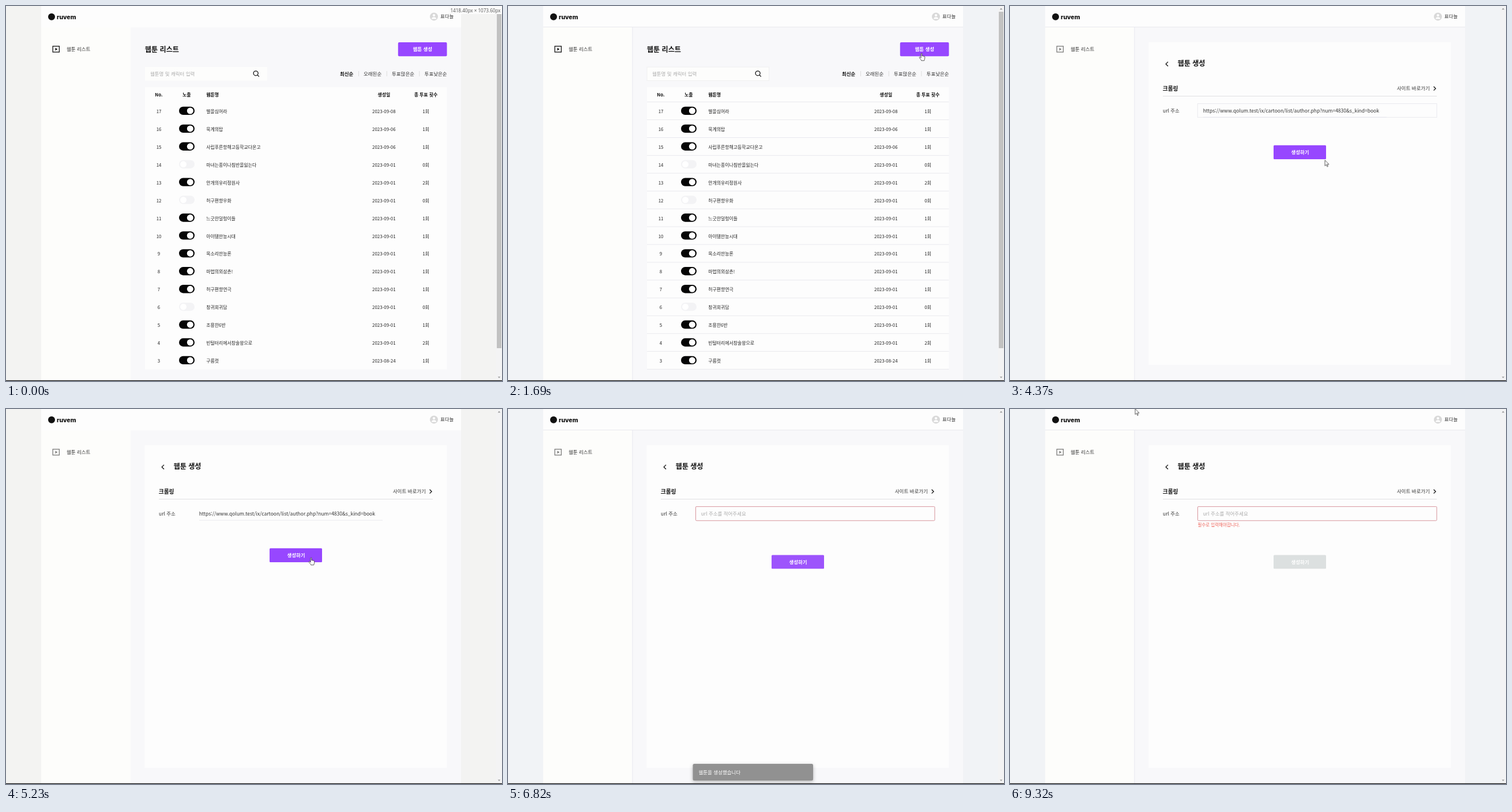
An HTML page that plays this animation: 860 by 651 pixels, repeating every 9.41 s.

```html
<!DOCTYPE html>
<html lang="ko">
<head>
<meta charset="utf-8">
<title>웹툰 관리</title>
<style>
  html, body { margin: 0; width: 100%; height: 100%; overflow: hidden; background: #f2f3f5; }
  svg { display: block; width: 860px; height: 651px; }
  text { font: 400 8.49px "Noto Sans CJK KR", "Noto Sans CJK JP", sans-serif; fill: #333; white-space: pre; }
  .s { font-size: 7.88px; fill: #222; }
  .l { font-size: 12.13px; fill: #111; }
  .b { font-weight: 700; fill: #111; }
  .m { font-weight: 500; }
  .mid { text-anchor: middle; }
  .hint { fill: #ababab; }
  .white { fill: #fff; }
  .line { stroke: #e9e9ee; stroke-width: 1; fill: none; }
  .ink { stroke: #111; stroke-width: 1.3; fill: none; }

  /* One shared 9410 ms loop; switches jump, the rest eases. */
  .sw { animation: 9410ms step-end infinite; }
  .mv { animation: 9410ms linear infinite; }

  .margin { animation-name: margin; }
  @keyframes margin { 0%, 51.222% { fill: #f3f3f2 } 5.845%, 66.419%, 100% { fill: #f1f3f6 } }
  .crisp { animation-name: crisp; }
  @keyframes crisp { 0%, 51.222% { opacity: 0 } 5.845%, 66.419%, 100% { opacity: 1 } }
  .label { animation-name: label; }
  @keyframes label { 0% { opacity: 1 } 5.845%, 100% { opacity: 0 } }
  .list { animation-name: list; }
  @keyframes list { 0% { opacity: 1 } 18.916%, 100% { opacity: 0 } }
  .form { animation-name: form; }
  @keyframes form { 0% { opacity: 0 } 18.916%, 100% { opacity: 1 } }
  .nav { animation-name: nav; }
  @keyframes nav { 0% { opacity: 1 } 18.916%, 100% { opacity: .55 } }

  .ask { animation-name: ask; }
  @keyframes ask { 0%, 71.52%, 100% { opacity: 1 } 35.813% { opacity: 0 } }
  .url { animation-name: url; }
  @keyframes url { 0%, 71.52%, 100% { opacity: 0 } 35.813% { opacity: 1 } }
  .caret { animation-name: caret; }
  @keyframes caret { 0%, 34.963%, 100% { opacity: 0 } 29.437% { opacity: 1 } }
  .bad { animation-name: bad; }
  @keyframes bad { 0% { opacity: 0 } 71.52%, 100% { opacity: 1 } }
  .error { animation-name: error; }
  @keyframes error { 0%, 72.8% { opacity: 0 } 74.92%, 100% { opacity: 1 } }
  .shift { animation-name: shift; }
  @keyframes shift { 0% { transform: none } 71.52%, 100% { transform: translateY(11.6px) } }
  .send { animation-name: send; }
  @keyframes send {
    0%, 35.813%, 74.92%, 100% { fill: #dce0e0 }
    38.47%, 72.264% { fill: #9747ff }
  }

  .toast { transform-origin: 425px 630px; animation-name: toast; }
  @keyframes toast {
    0%, 71.52% { opacity: 0; transform: scale(.75, .56); animation-timing-function: ease-out }
    72.37%, 88.4% { opacity: 1; transform: none; animation-timing-function: ease-in }
    89.479%, 100% { opacity: 0; transform: scale(.85, .75) }
  }

  .cursor { animation-name: cursor; }
  @keyframes cursor {
    0%, 5.845% { transform: translate(860px, 330px); animation-timing-function: ease-in-out }
    15.834%, 24.23% { transform: translate(717px, 82px); animation-timing-function: ease-in }
    25.824%, 41.125% { transform: translate(600px, 182px) }
    41.126% { transform: translate(722px, 190px); animation-timing-function: ease-in-out }
    46.76% { transform: translate(545px, 268px); animation-timing-function: ease-in-out }
    50.903%, 71.52% { transform: translate(529px, 258px) }
    71.521%, 91.817% { transform: translate(553px, 248px); animation-timing-function: ease-in-out }
    99.044%, 100% { transform: translate(217px, -.5px) }
  }
  .arrow { animation-name: arrow; }
  @keyframes arrow {
    0%, 15.4%, 25.5%, 48.35%, 71.52% { opacity: 0 }
    5.845%, 18.916%, 41.126%, 91.817%, 100% { opacity: 1 }
  }
  .hand { animation-name: hand; }
  @keyframes hand {
    0%, 18.916%, 71.52%, 100% { opacity: 0 }
    15.4%, 48.35% { opacity: 1 }
  }
  .cursor path { fill: #fff; stroke: #333; stroke-width: .8; stroke-linejoin: round; }
</style>
</head>
<body>
<svg viewBox="0 0 860 651">
  <!-- page shell -->
  <rect class="sw margin" width="860" height="651"/>
  <rect x="61" width="728" height="651" fill="#fdfdfd"/>
  <rect x="61" y="37" width="155" height="613" fill="#fdfdfb"/>
  <rect x="216" y="37" width="573" height="613" fill="#f8f8fa"/>
  <path class="line sw crisp" d="M61 36.5H789M215.9 37V650"/>

  <circle cx="79" cy="18.8" r="6" fill="#111"/>
  <text x="88" y="22.6" style="font:800 10.5px Inter,sans-serif;fill:#111">ruvem</text>
  <circle cx="742" cy="18.4" r="7" fill="#d9d9d9"/>
  <circle cx="742" cy="16.2" r="2.1" fill="#fff"/>
  <path d="M737.8 22.6c0-4.6 8.4-4.6 8.4 0z" fill="#fff"/>
  <text x="753" y="21.3">표다늘</text>

  <g class="sw nav">
    <rect class="ink" x="81.2" y="69.8" width="11.2" height="10.2"/>
    <path d="M85.5 72.6v4.8l3.8-2.4z" fill="#111"/>
  </g>
  <text x="105" y="78.3">웹툰 리스트</text>

  <!-- list view -->
  <g class="sw list">
    <text class="l b" x="240.8" y="79.8">웹툰 리스트</text>
    <rect x="679.8" y="63" width="84.7" height="24.3" rx="2" fill="#9747ff"/>
    <text class="b white mid" x="722.3" y="78.4" style="fill:#fff">웹툰 생성</text>

    <rect x="241" y="106" width="211.5" height="23.5" fill="#fdfdfc"/>
    <rect class="line sw crisp" x="241" y="106" width="211.5" height="23.5" style="stroke:#f0f0f0"/>
    <text class="hint" x="250" y="120.9">웹툰명 및 캐릭터 입력</text>
    <circle class="ink" cx="433.1" cy="116.8" r="4"/>
    <path class="ink" d="M436 119.8l2.8 2.8"/>

    <text class="b" x="579" y="120.7">최신순</text>
    <text x="620" y="120.7" fill="#555">오래된순</text>
    <text x="669" y="120.7">투표많은순</text>
    <text x="725.6" y="120.7">투표낮은순</text>
    <path class="line" d="M611.5 113v9M660.3 113v9M716.8 113v9" style="stroke:#ddd"/>

    <rect x="241" y="141" width="523.5" height="490" fill="#fdfdfd"/>
    <text class="s b mid" x="265" y="157.2">No.</text>
    <text class="s b mid" x="313.3" y="157.2">노출</text>
    <text class="s b" x="347.3" y="157.2">웹툰명</text>
    <text class="s b mid" x="655.3" y="157.2">생성일</text>
    <text class="s b mid" x="728" y="157.2">총 투표 횟수</text>
    <g id="rows"></g>
    <path id="rules" class="line sw crisp"/>
  </g>

  <!-- form view -->
  <g class="sw form">
    <rect x="240.5" y="63" width="524" height="560" fill="#fdfdfd"/>
    <path class="ink" d="M274 96.9l-3.8 3.8 3.8 3.8"/>
    <text class="l b" x="290.5" y="104.4">웹툰 생성</text>
    <text class="b" x="264.8" y="146.7" style="font-size:9.7px">크롤링</text>
    <text class="m" x="670.8" y="146.2">사이트 바로가기</text>
    <path class="ink" d="M734.6 139.8l3.4 3.4-3.4 3.4"/>
    <path class="line" d="M265 156.5H740" style="stroke:#e0e0e2"/>
    <text class="m" x="265" y="185">url 주소</text>
    <path class="line sw url" d="M335 193.2H653"/>
    <rect class="line sw crisp" x="325.3" y="169.5" width="414.7" height="23.8"/>
    <rect class="sw bad" x="325.5" y="169.4" width="414.4" height="24.4" rx="1.5" fill="#fdfdfd" stroke="#db979f"/>
    <text class="hint sw ask" x="334.7" y="184.6">url 주소를 적어주세요</text>
    <text class="sw url" x="334.7" y="184.6">https://www.qolum.test/ix/cartoon/list/author.php?num=4830&amp;s_kind=book</text>
    <path class="sw caret" d="M335 175.5V187" stroke="#333" stroke-width=".8"/>
    <text class="mv error" x="325.5" y="204" style="font-size:7.5px;fill:#ee6259">필수로 입력해야합니다.</text>
    <g class="sw shift">
      <rect class="mv send" x="457" y="241.8" width="91" height="24.2" rx="1.5"/>
      <text class="b mid" x="503" y="257" style="fill:#fff">생성하기</text>
    </g>
  </g>

  <!-- scrollbar -->
  <rect x="850" width="10" height="650" fill="#f3f3f4"/>
  <rect class="sw list" x="851" y="10" width="8" height="584" fill="#c1c1c1"/>
  <path d="M852.7 6.2h4.6l-2.3-2.6zM852.7 643.4h4.6l-2.3 2.6z" fill="#999"/>
  <g class="sw label">
    <rect x="767" width="93" height="14" fill="#fbfbfb"/>
    <text x="857.5" y="11.2" text-anchor="end" style="font:8.15px 'Open Sans',sans-serif;fill:#555">1418.40px × 1073.60px</text>
  </g>
  <rect y="649.8" width="860" height="1.2" fill="#111"/>

  <g class="mv toast">
    <rect x="320.5" y="616" width="208.5" height="29" rx="2.5" fill="#919191" style="filter:drop-shadow(0 2px 3px #0004)"/>
    <text class="white" x="330.5" y="633.9">웹툰을 생성했습니다</text>
  </g>

  <g class="mv cursor">
    <path class="sw arrow" d="M0 0V10l2.3-2.1 1.6 3.5 1.5-.7-1.6-3.4h3.2z"/>
    <path class="sw hand" d="M-.9 1c0-1.3 1.8-1.3 1.8 0v4c.2-.9 1.7-.8 1.7.2.3-.7 1.6-.5 1.6.4.4-.6 1.5-.3 1.5.6v2.6c0 1.6-1 2.3-1 4h-5c0-1.600-2.600-3.200-3.400-5.200-.4-1.100.9-1.600 1.500-.7l1.300 1.300z"/>
  </g>
</svg>
<script>
  const titles = ['별을심어라', '묵계의탑', '사립푸른항해고등학교다온고', '마녀는종이나침반을잃는다',
    '안개의유리정원사', '허구편향우화', '느긋한덜렁이들', '아이템만능시대', '목소리만능론',
    '마법의외삼촌!', '허구편향연극', '창귀회귀담', '조용한6반', '빈털터리에서창술왕으로', '구름컷'];
  const votes = '111020111110121';
  const dates = { 17: '2023-09-08', 16: '2023-09-06', 15: '2023-09-06', 3: '2023-08-24' };
  const step = 30.93;

  const text = (x, y, str, cls = '') => `<text class="s m ${cls}" x="${x}" y="${y}">${str}</text>`;

  const toggle = (y, on) => `
    <rect x="300" y="${y - 7.3}" width="27" height="14.4" rx="7.2" fill="${on ? '#050505' : '#f3f3f5'}"/>
    <circle cx="${on ? 319.3 : 307.5}" cy="${y}" r="5.5" fill="#fff"/>`;

  let rows = '', rules = 'M241 166.600H764.5';
  titles.forEach((title, i) => {
    const no = 17 - i, y = 182 + i * step, base = y + 4;
    rows += text(265, base, no, 'mid') + toggle(y, votes[i] !== '0') + text(347.3, base, title)
      + text(655.3, base, dates[no] || '2023-09-01', 'mid') + text(728, base, votes[i] + '회', 'mid');
    rules += `M241 ${166.6 + (i + 1) * step}H764.5`;
  });
  document.getElementById('rows').innerHTML = rows;
  document.getElementById('rules').setAttribute('d', rules);
</script>
</body>
</html>
```
